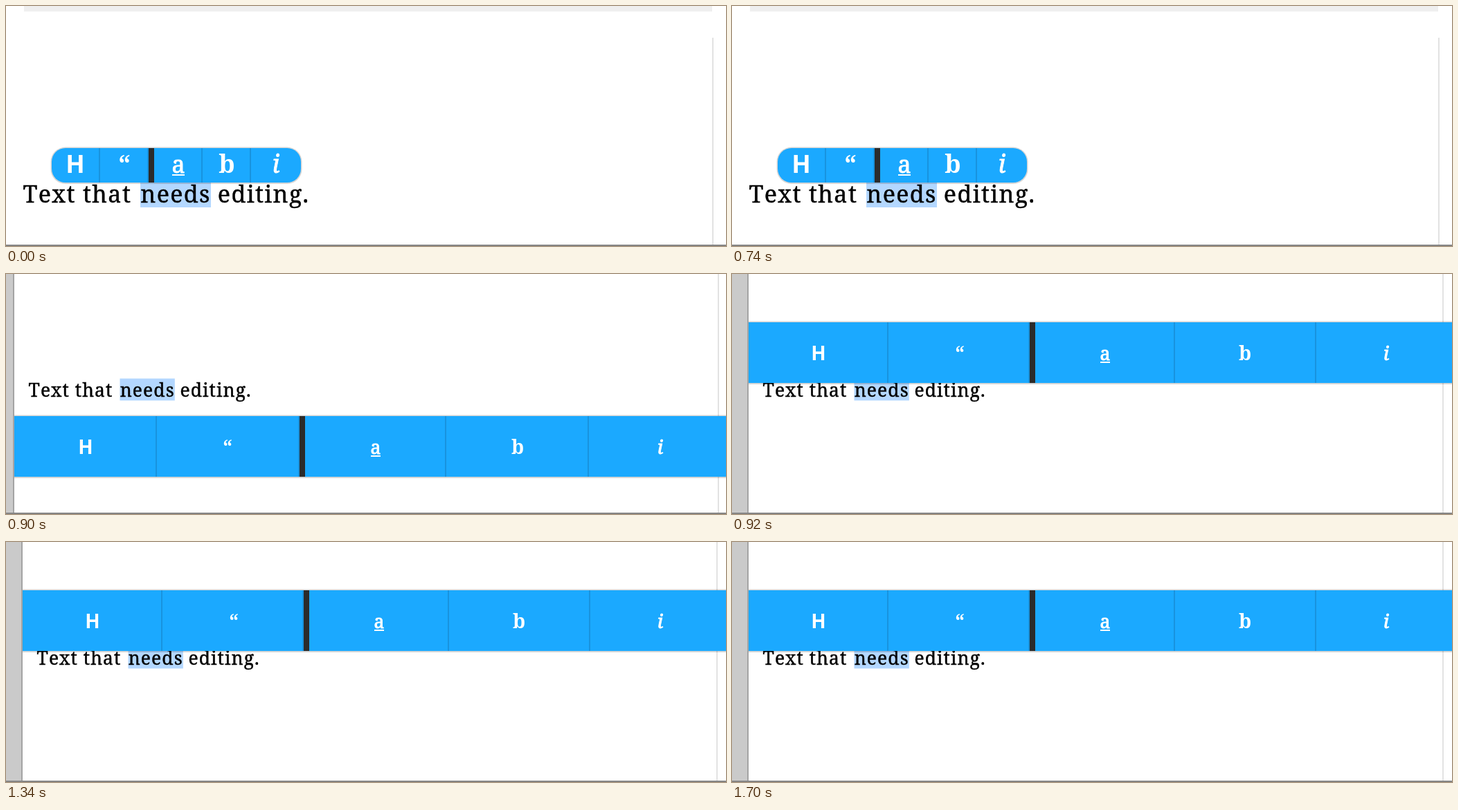
Animation, 1040 px wide and 348 px high, one loop 2.62 s. Source, as an HTML page:

```html
<!DOCTYPE html>
<html lang="en">
<head>
<meta charset="utf-8">
<title>Responsive editing toolbar</title>
<style>
  html, body { margin: 0; width: 100%; height: 100%; overflow: hidden; background: #fff; }
  svg { display: block; width: 1040px; height: 348px; }
  .serif { font-family: "Noto Serif", "DejaVu Serif", serif; font-kerning: none; }
  .sans { font-family: "Open Sans", "Noto Sans", sans-serif; font-weight: 700; }
  .body { stroke: #000; stroke-width: .45; }
  .icon { fill: #fff; text-anchor: middle; }
  .heavy { stroke: #fff; stroke-width: .9; }
</style>
</head>
<body>
<svg id="stage" viewBox="0 0 1040 348" xmlns="http://www.w3.org/2000/svg"></svg>
<script>
const LOOP = 2620;
const stage = document.getElementById('stage');

const rect = (x, y, w, h, fill, extra = '') =>
  `<rect x="${x}" y="${y}" width="${w}" height="${h}" fill="${fill}" ${extra}/>`;
const label = (text, x, y, size, attrs) =>
  `<text x="${x}" y="${y}" font-size="${size}" ${attrs}>${text}</text>`;

const compact = {
  scale: 1, textX: 24.5, textY: 285, ruleX: 1020, ruleY: 46, header: true,
  bar: { x: 66, y: 206, w: 360, h: 50, r: 20, baseline: 241.5,
         dividers: [134, 204, 282, 352], caret: 206, icons: [100, 171, 249, 319, 390] }
};
const wideBelow = {
  scale: 0.778, edge: 12, textX: 32.6, textY: 178, ruleX: 1028, ruleY: 0,
  bar: { x: 12, y: 206, w: 1040, h: 88, r: 0, baseline: 260.5,
         dividers: [216, 422, 634, 840], caret: 424, icons: [115, 320, 534, 739, 945] }
};
const wideAbove = {
  scale: 0.778, edge: 24, textX: 44.6, textY: 178, ruleX: 1026, ruleY: 0,
  bar: { x: 24, y: 70, w: 1030, h: 88, r: 0, baseline: 124.5,
         dividers: [224, 428, 638, 842], caret: 430, icons: [125, 329, 539, 741, 945] }
};

function sentence({ scale: k, textX, textY }) {
  const words = [['Text that', 0], ['needs', 169.8], ['editing.', 281.3]];
  const style = `class="serif body" letter-spacing="${1.4 * k}"`;
  return rect(textX + 169.5 * k, textY - 34 * k, 102 * k, 41 * k, '#b3d7ff') +
    words.map(([w, dx]) => label(w, textX + dx * k, textY, 34 * k, style)).join('');
}

function toolbar({ scale: k, bar }) {
  const { x, y, w, h, r, baseline, dividers, caret, icons } = bar;
  const icon = (text, i, size, attrs) => label(text, icons[i], baseline, size * k, attrs);
  return rect(x - 1.5, y - 1.5, w + 3, h + 3.5, '#000', `rx="${r && r + 1.5}" opacity=".16"`) +
    rect(x, y, w, h, '#1ba9ff', `rx="${r}"`) +
    dividers.map(d => rect(d, y, 2, h, '#000', 'opacity=".13"')).join('') +
    rect(caret, y, 8, h, '#2b2b2b') +
    icon('H', 0, 36, 'class="sans icon"') +
    icon('“', 1, 36, 'class="serif icon" font-weight="700"') +
    icon('a', 2, 34, 'class="serif icon heavy"') +
    rect(icons[2] - 9 * k, baseline + 2.5, 18 * k, 2, '#fff') +
    icon('b', 3, 36, 'class="serif icon" font-weight="700"') +
    icon('i', 4, 36, 'class="serif icon heavy" font-style="italic"');
}

function page(layout, shift = 0) {
  const edge = layout.edge ?? shift - 2;
  const desktop = edge > 0
    ? rect(0, 0, edge, 348, '#cacaca') + rect(edge - 2, 0, 2, 348, '#a4a4a4')
    : '';
  return `<g transform="translate(${shift} 0)">` +
    (layout.header ? rect(26, 0, 994, 8, '#efefef') : '') +
    rect(layout.ruleX, layout.ruleY, 2, 348 - layout.ruleY, '#e2e2e2') +
    sentence(layout) + toolbar(layout) + '</g>' +
    desktop + rect(0, 346, 1040, 2, '#858585');
}

function draw(t) {
  if (t >= 920) return page(wideAbove);
  if (t >= 900) return page(wideBelow);
  // The window edge is dragged in steps of two pixels.
  const drag = Math.min(1, Math.max(0, (t - 740) / 140));
  return page(compact, 2 * Math.round(6 * drag));
}

let shown = '';
function tick() {
  const next = draw(performance.now() % LOOP);
  if (next !== shown) stage.innerHTML = shown = next;
  requestAnimationFrame(tick);
}
tick();
</script>
</body>
</html>
```
